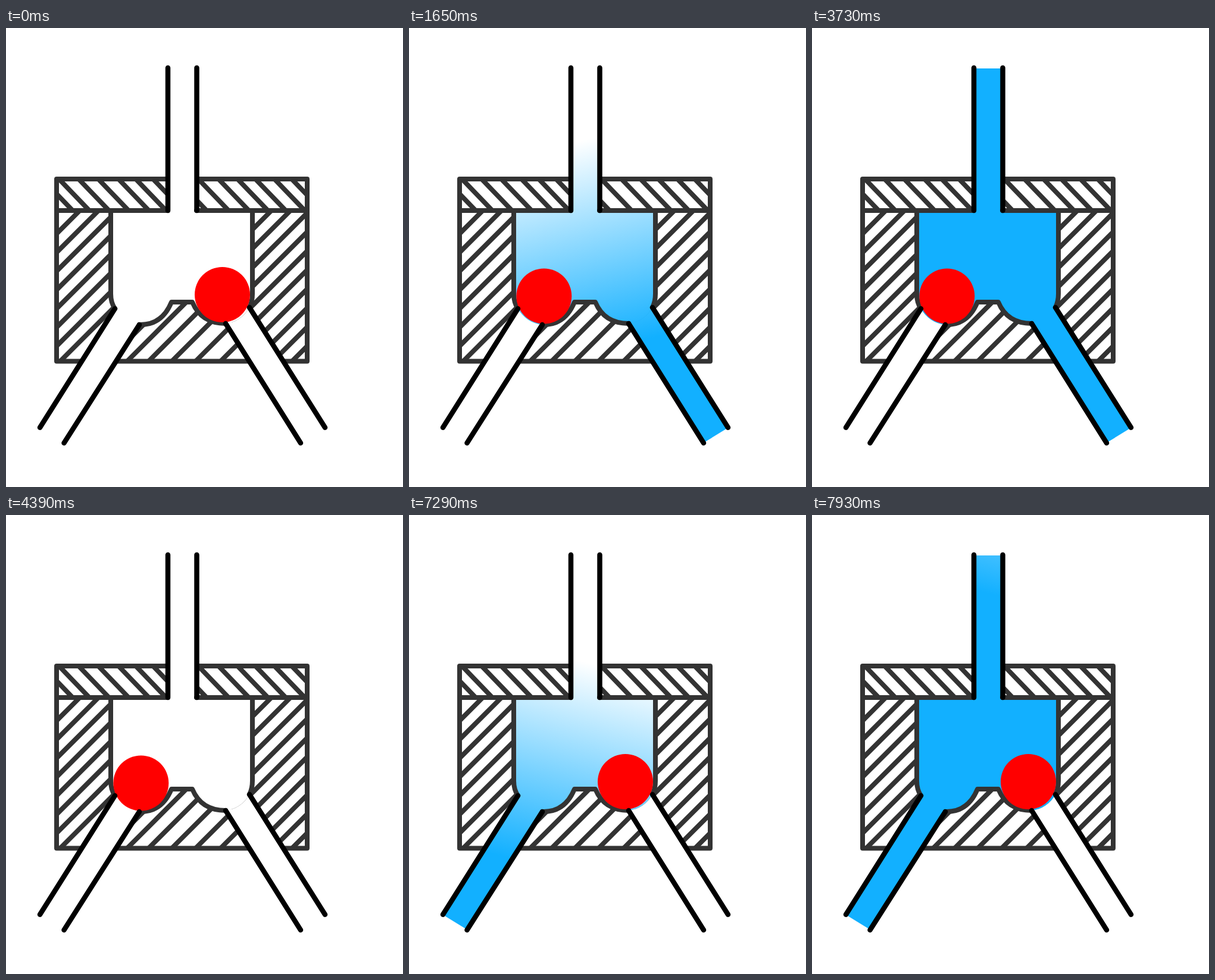
An HTML page that plays this animation: 667 px wide and 772 px high, repeating every 8 s.

```html
<!DOCTYPE html>
<html lang="en">
<head>
<meta charset="utf-8">
<title>Shuttle valve</title>
<style>
html, body { margin: 0; width: 100%; height: 100%; overflow: hidden; background: #fff; }
svg { display: block; width: 667px; height: 772px; }
.line { fill: none; stroke: #333; stroke-width: 8; stroke-linecap: round; stroke-linejoin: round; }
.hatch { fill: none; stroke: #333; stroke-width: 8; }
.pipe { fill: none; stroke: #000; stroke-width: 8.5; stroke-linecap: round; }
</style>
</head>
<body>
<svg viewBox="0 0 667 772">
  <defs>
    <linearGradient id="flow" gradientUnits="userSpaceOnUse" x1="296" y1="0" x2="296" y2="340">
      <stop offset="0" stop-color="#12b0ff" stop-opacity="0"/>
      <stop offset="1" stop-color="#12b0ff"/>
    </linearGradient>
    <path id="chamber" d="M272 68V307H176V447Q176 462 183 472A52 52 0 0 0 224 499Q262 500 278 461H313Q328 497 369 497A52 52 0 0 0 409 470Q414 460 414 447V307H320V68Z"/>
    <path id="leftPipe" d="M183 472L58 673L97 697L224 499A52 52 0 0 1 183 472Z"/>
    <path id="rightPipe" d="M409 470L535 673L496 697L369 497A52 52 0 0 0 409 470Z"/>
    <clipPath id="fromLeft"><use href="#chamber"/><use href="#leftPipe"/></clipPath>
    <clipPath id="fromRight"><use href="#chamber"/><use href="#rightPipe"/></clipPath>
  </defs>

  <g id="hatching"></g>
  <path class="line" d="M85 254H506V560.5H85ZM85 307H506"/>
  <g fill="#fff">
    <rect x="272" y="240" width="48" height="72"/>
    <use href="#chamber"/><use href="#leftPipe"/><use href="#rightPipe"/>
  </g>
  <g id="fluid"><rect width="667" height="772" fill="url(#flow)"/></g>
  <path class="line" d="M272 307H176V447Q176 462 183 472M320 307H414V447Q414 460 409 470M224 499Q262 500 278 461H313Q328 497 369 497"/>
  <circle id="ball" r="46.5" fill="#f00"/>
  <path class="pipe" d="M272 67V307M320.5 67V307M183 472L57 672M224 499L97.500 698M409 470L536 672M369 497L495 698"/>
</svg>
<script>
const LOOP = 8000, STEP = 80;
const RIGHT_FILL = 1010, DRAIN = 3730, DRAIN_END = 4390, LEFT_FILL = 6730;
const get = id => document.getElementById(id);
const fluid = get('fluid'), flow = get('flow'), ball = get('ball');
const clamp = v => Math.max(0, Math.min(1, v));
const series = (from, gap, count) => Array.from({ length: count }, (_, i) => from + gap * i);

// Hatch one block; starts are the x positions where the strokes meet its lower edge.
function hatch(id, x, y, w, h, starts, dx) {
  const d = starts.map(s => `M${s} ${y + h}l${dx} ${-h}`).join('');
  get('hatching').insertAdjacentHTML('beforeend',
    `<clipPath id="${id}"><rect x="${x}" y="${y}" width="${w}" height="${h}"/></clipPath>
     <path class="hatch" clip-path="url(#${id})" d="${d}"/>`);
}
hatch('lidLeft', 85, 254, 187, 53, [112, 140, 173, 206, 240, 269, 298], -51);
hatch('lidRight', 320, 254, 186, 53, [337, 374, 408, 440, 470, 502, 531], -51);
hatch('wallLeft', 85, 307, 99, 254, series(-130, 31.5, 8), 254);
hatch('middle', 184, 307, 225, 254, [169, 203, 239, 278, 318, 360], 254);
hatch('wallRight', 409, 307, 97, 254, series(192, 32, 10), 254);

function setFlow(step, side) {
  const front = 663 - 59.4 * step;
  flow.setAttribute('y1', front);
  flow.setAttribute('x2', 296 + side * 81);
  flow.setAttribute('y2', front + 340.6);
  fluid.setAttribute('clip-path', side < 0 ? 'url(#fromLeft)' : 'url(#fromRight)');
}

// p = 0 is the right seat, p = 1 the left seat.
function setBall(p) {
  ball.setAttribute('cx', 363.5 - 136.700 * p);
  ball.setAttribute('cy', 448.5 + 2.5 * p - 38 * Math.sin(Math.PI * p));
}

function draw(t) {
  const stepFrom = start => Math.floor((t - start) / STEP);
  const travel = k => clamp((k - 2) / 5);
  let opacity = 0;

  if (t < RIGHT_FILL) {
    setBall(0);
  } else if (t < LEFT_FILL) {
    const k = Math.min(16, stepFrom(RIGHT_FILL));
    setFlow(t < DRAIN ? k : 20, 1);
    setBall(travel(k));
    const drained = Math.floor((t - DRAIN) * 8 / (DRAIN_END - DRAIN)) / 8;
    opacity = 1 - clamp(drained);
  } else {
    const k = stepFrom(LEFT_FILL);
    setFlow(k, -1);
    setBall(1 - travel(k));
    opacity = 1;
  }
  fluid.setAttribute('opacity', opacity);
}

const began = performance.now();
function tick() {
  draw((performance.now() - began) % LOOP);
  requestAnimationFrame(tick);
}
tick();
</script>
</body>
</html>
```
